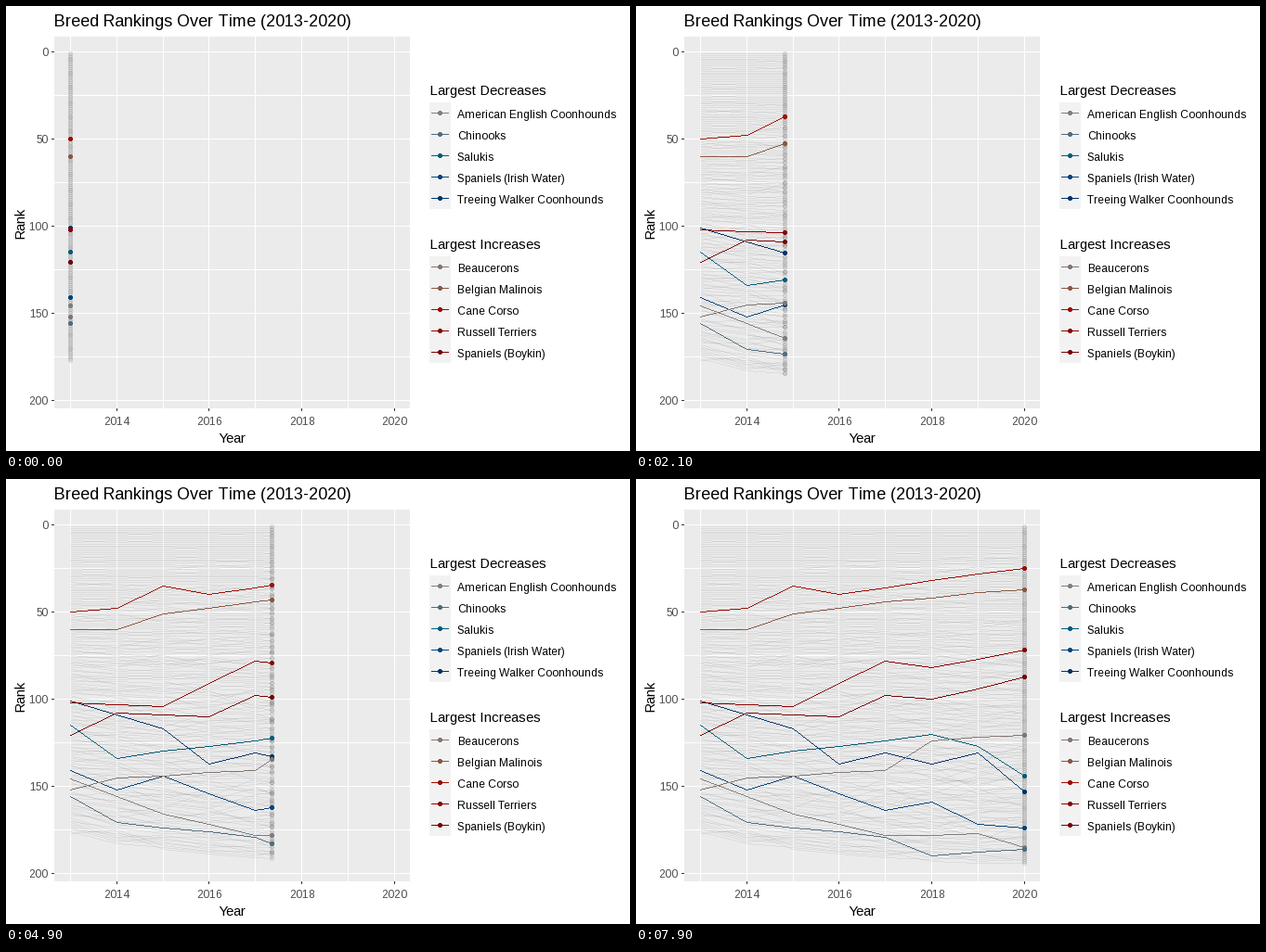
Recreate the animation shown at these times as a matplotlib script. Size 672 by 480 pixels, loop 10 s.

```python
import numpy as np
import matplotlib.pyplot as plt
from matplotlib.animation import FuncAnimation
from matplotlib.colors import to_rgb

plt.rcParams.update({
    "font.family": "Liberation Sans",
    "text.hinting": "force_autohint",
    "text.hinting_factor": 1,
})

WIDTH, HEIGHT, DPI = 672, 480, 96
YEARS = np.arange(2013, 2021)
LAST_FRAME = 79
KEYFRAMES = np.round(np.linspace(0, LAST_FRAME, len(YEARS)))
BREED_COUNTS = np.round(196 - 19 * 0.7 ** (YEARS - 2013)).astype(int)
LATE_BREEDS = np.repeat(YEARS[1:], np.diff(BREED_COUNTS))
GREY, GREY_ALPHA = "#6b6b6b", 0.11

# Each breed: colour and the turning points of its rank.
DECREASES = {
    "American English Coonhounds":
        ("#7f7f7f", {2013: 146, 2015: 166, 2017: 178, 2019: 177, 2020: 185}),
    "Chinooks":
        ("#536d7d", {2013: 156, 2014: 171, 2017: 179, 2018: 190, 2020: 186}),
    "Salukis":
        ("#005d7b", {2013: 115, 2014: 134, 2018: 120, 2019: 127, 2020: 144}),
    "Spaniels (Irish Water)":
        ("#00457c", {2013: 141, 2014: 152, 2015: 144, 2017: 164, 2018: 159,
                     2019: 172, 2020: 174}),
    "Treeing Walker Coonhounds":
        ("#00356b", {2013: 101, 2015: 117, 2016: 137, 2017: 131, 2018: 137,
                     2019: 131, 2020: 153}),
}
INCREASES = {
    "Beaucerons":
        ("#837670", {2013: 152, 2014: 145, 2017: 141, 2018: 124, 2020: 121}),
    "Belgian Malinois":
        ("#8b5742", {2013: 60, 2014: 60, 2015: 51, 2017: 44, 2020: 37}),
    "Cane Corso":
        ("#9c1000", {2013: 50, 2014: 48, 2015: 35, 2016: 40, 2018: 32, 2020: 25}),
    "Russell Terriers":
        ("#8b0000", {2013: 102, 2015: 104, 2017: 78, 2018: 82, 2020: 72}),
    "Spaniels (Boykin)":
        ("#780000", {2013: 121, 2014: 108, 2016: 110, 2017: 98, 2018: 100,
                     2020: 87}),
}


def x_px(year):
    return 69.5 + 49.8 * (year - 2013)


def y_px(rank):
    return 49.5 + 1.88 * rank


def yearly_ranks(points):
    return np.round(np.interp(YEARS, list(points), list(points.values())))


def other_ranks(taken):
    """Ranks of the remaining breeds; NaN before a breed joins the list."""
    rng = np.random.default_rng(7)
    count = BREED_COUNTS[-1] - len(taken)
    score = np.linspace(1, 185, count)
    joined = np.full(count, YEARS[0])
    late = rng.choice(np.arange(60, count), len(LATE_BREEDS), replace=False)
    joined[late] = LATE_BREEDS
    ranks = np.full((count, len(YEARS)), np.nan)
    for i, year in enumerate(YEARS):
        active = np.flatnonzero(joined <= year)
        free = np.setdiff1d(np.arange(1, BREED_COUNTS[i] + 1), taken[:, i])
        ranks[active[np.argsort(score[active])], i] = free[:len(active)]
        score = score + rng.normal(size=count) * (0.2 + 0.025 * score)
    return ranks


# Crisp drawing without antialiasing, straight onto an RGB canvas.
def fill(canvas, x0, y0, x1, y1, color):
    canvas[y0:y1, x0:x1] = to_rgb(color)


def blend(canvas, rows, cols, color, alpha):
    canvas[rows, cols] += alpha * (np.array(to_rgb(color)) - canvas[rows, cols])


def stroke(canvas, xs, ys, color, alpha=1):
    """One-pixel polyline; all slopes are gentle, so one pixel per column."""
    xs, ys = np.floor(xs), np.floor(ys)
    cols = np.arange(int(xs[0]), int(xs[-1]) + 1)
    rows = np.round(np.interp(cols, xs, ys)).astype(int)
    blend(canvas, rows, cols, color, alpha)


DY, DX = np.mgrid[-2:3, -2:3]
DISC = DX ** 2 + DY ** 2 < 8
RIM = DISC & (np.maximum(abs(DX), abs(DY)) == 2)


def dot(canvas, x, y, color, alpha=1):
    for mask in (DISC, RIM):  # fill, then outline over it
        blend(canvas, int(y) + DY[mask], int(x) + DX[mask], color, alpha)


fig = plt.figure(figsize=(WIDTH / DPI, HEIGHT / DPI), dpi=DPI, facecolor="white")
ax = fig.add_axes([0, 0, 1, 1])
ax.axis("off")


def label(x, y, text, px=12, color="black", **kw):
    ax.text(x, y, text, fontsize=px * 72 / DPI, color=color, va="baseline",
            rotation_mode="anchor", **kw)


def draw_panel(canvas):
    fill(canvas, 52, 33, 435, 434, "#ebebeb")
    for year in YEARS:
        x = int(x_px(year))
        fill(canvas, x, 33, x + 1, 434, "white")
        if year % 2 == 0:
            fill(canvas, x, 434, x + 1, 437, "#333333")
            label(x + 0.5, 452, str(year), color="#4d4d4d", ha="center")
    for rank in range(0, 201, 25):
        y = int(y_px(rank))
        fill(canvas, 52, y, 435, y + 1, "white")
        if rank % 50 == 0:
            fill(canvas, 49, y, 52, y + 1, "#333333")
            label(45.5, y + 5, str(rank), color="#4d4d4d", ha="right")
    label(52, 22, "Breed Rankings Over Time (2013-2020)", 18)
    label(243.5, 471, "Year", 15, ha="center")
    label(19, 234, "Rank", 15, ha="center", rotation=90)


def draw_legend(canvas, top, title, breeds):
    label(456, top - 8, title, 15)
    fill(canvas, 456, top, 479, top + 115, "#f2f2f2")
    for i, (name, (color, _)) in enumerate(breeds.items()):
        y = int(top + 11.5 + 23.04 * i)
        fill(canvas, 458, y, 477, y + 1, color)
        dot(canvas, 467, y, color)
        label(486, y + 6, name)


backdrop = np.ones((HEIGHT, WIDTH, 3))
draw_panel(backdrop)
draw_legend(backdrop, 104, "Largest Decreases", DECREASES)
draw_legend(backdrop, 270, "Largest Increases", INCREASES)
picture = ax.imshow(backdrop, extent=(0, WIDTH, HEIGHT, 0),
                    interpolation="nearest", aspect="auto")
ax.set(xlim=(0, WIDTH), ylim=(HEIGHT, 0))

featured = [*DECREASES.values(), *INCREASES.values()]
colors = [color for color, _ in featured]
featured_ranks = np.array([yearly_ranks(points) for _, points in featured])
background_ranks = other_ranks(featured_ranks)


def reveal(ranks, now):
    """Path of one breed up to the moment `now`, in pixels."""
    known = ~np.isnan(ranks)
    years, ranks = YEARS[known], ranks[known]
    if years[0] > now:
        return None
    past = years < now
    xs = np.append(years[past], now)
    ys = np.append(ranks[past], np.interp(now, years, ranks))
    return x_px(xs), y_px(ys)


def draw_breeds(canvas, all_ranks, colors, now, alpha=1):
    paths = [(reveal(ranks, now), color) for ranks, color in zip(all_ranks, colors)]
    paths = [(path, color) for path, color in paths if path]
    for (xs, ys), color in paths:
        stroke(canvas, xs, ys, color, alpha)
    for (xs, ys), color in paths:
        dot(canvas, xs[-1], ys[-1], color, alpha)


def update(frame):
    now = np.interp(frame, KEYFRAMES, YEARS)
    canvas = backdrop.copy()
    greys = [GREY] * len(background_ranks)
    draw_breeds(canvas, background_ranks, greys, now, GREY_ALPHA)
    draw_breeds(canvas, featured_ranks, colors, now)
    picture.set_data(canvas)
    return [picture]


anim = FuncAnimation(fig, update, frames=100, interval=100,
                     repeat=True, repeat_delay=0, blit=False)
plt.show()
```
